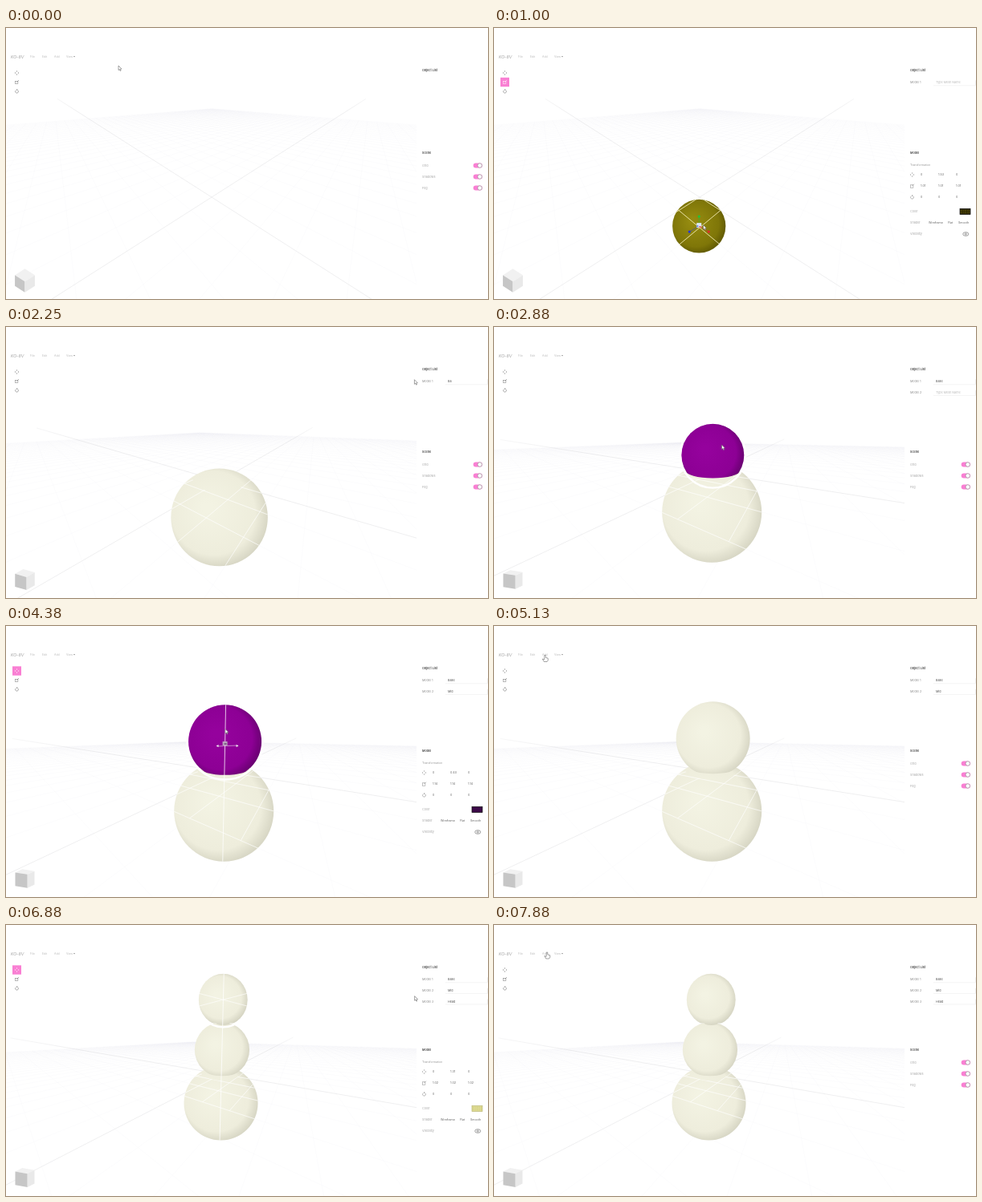
Recreate the animation shown at these times as an HTML page with a canvas. Size 600 by 338 pixels, loop 8 s.

```html
<!DOCTYPE html>
<html lang="en">
<head>
<meta charset="utf-8">
<style>
html, body { margin: 0; width: 100%; height: 100%; overflow: hidden; background: #fff; }
canvas { display: block; }
</style>
</head>
<body>
<canvas id="stage" width="600" height="338"></canvas>
<script>
const c = document.getElementById('stage').getContext('2d');
const LOOP = 8000, STEP = 125, FOCAL = 152, VIEW = 511;
const PINK = '#f97fd3', GRAY = '#a9a9a9', DARK = '#444', CREAM = ['#f3f3e3', '#eeeddc', '#d5d4c2'];
const PURPLE = ['#95029d', '#8d0095', '#66006e'];

// Key points: [time, ...values], eased in between.
// Camera: floor origin x and y, yaw and elevation in degrees, distance, zoom of the balls.
const CAMERA = [
  [1875, 256, 211, 45, 39.7, 4.7, .92],
  [2500, 272, 182, 60, 15.8, 5.2, 1],
  [5375, 272, 182, 60, 15.8, 5.2, 1],
  [5750, 268.3, 186, 60, 17.3, 7, .742]];
// Balls: keys hold height and radius, unit turns both into panel values.
const BALLS = [
  { from: 500, cream: 2000, named: 2125, name: 'Base', unit: [33.4, 35.6],
    tone: ['#958b10', '#7f7608', '#5f5802'], keys: [[500, 0, 36], [875, -51, 36], [1000, -51, 36], [1375, -51, 62]] },
  { from: 2750, cream: 4625, named: 3875, name: 'Mid', unit: [100, 40],
    tone: PURPLE, keys: [[3500, 23, 39], [4375, 39.5, 45.5], [4750, 43, 46]] },
  { from: 5375, cream: 6500, named: 6500, name: 'Head', unit: [100, 40],
    tone: PURPLE, keys: [[6000, 121, 43], [6500, 131, 41]] }];
const PICKS = [
  { from: 500, to: 2125, ball: 0, scaling: [1000, 1500] },
  { from: 3125, to: 4750, ball: 1, scaling: [0, 0] },
  { from: 5625, to: 6500, ball: 1, scaling: [5625, 6250] },
  { from: 6500, to: 7500, ball: 2, scaling: [0, 0] }];
const CURSOR = [[0, 140, 47], [500, 63, 36], [875, 256, 245], [1375, 285, 249], [1750, 546, 245],
  [2125, 560, 69], [2750, 64, 37], [2875, 283.5, 147], [3875, 560, 82], [4375, 273, 128.5],
  [4625, 586, 229], [5125, 63.5, 36.5], [6000, 270.5, 138.5], [6625, 560, 95], [7875, 66, 34]];

let t, cam;

function at(keys) {
  let i = keys.findIndex(k => k[0] > t);
  if (i < 0) i = keys.length;
  const a = keys[Math.max(0, i - 1)], b = keys[Math.min(i, keys.length - 1)];
  const p = b === a ? 0 : (t - a[0]) / (b[0] - a[0]), e = p * p * (3 - 2 * p);
  return a.slice(1).map((v, n) => v + (b[n + 1] - v) * e);
}
function setCamera() {
  const [x, y, yaw, tilt, dist, zoom] = at(CAMERA), rad = Math.PI / 180;
  cam = { x, y, dist, zoom, cy: Math.cos(yaw * rad), sy: Math.sin(yaw * rad),
    ce: Math.cos(tilt * rad), se: Math.sin(tilt * rad) };
}
const turn = (x, z) => [x * cam.cy - z * cam.sy, x * cam.sy + z * cam.cy];

function ballAt(ball) {
  const [h, size] = at(ball.keys), r = size * cam.zoom;
  return { h, size, r, x: cam.x + h * .015, y: cam.y - h * cam.ce * cam.zoom, ry: r * (1 + (h / 500) ** 2) };
}

function line(x1, y1, x2, y2, color, width = 1) {
  c.strokeStyle = color; c.lineWidth = width;
  c.beginPath(); c.moveTo(x1, y1); c.lineTo(x2, y2); c.stroke();
}
function poly(points, fill, stroke) {
  c.beginPath();
  points.forEach(p => c.lineTo(...p));
  c.closePath();
  c.fillStyle = fill; c.fill();
  if (stroke) { c.strokeStyle = stroke; c.lineWidth = .6; c.stroke(); }
}
function oval(x, y, rx, ry = rx) { c.beginPath(); c.ellipse(x, y, rx, ry, 0, 0, 7); }
function box(x, y, w, h, color) { c.fillStyle = color; c.fillRect(x, y, w, h); }
function text(s, x, y, color = GRAY, size = 3.8, style = '') {
  c.font = `${style} ${size}px Inter, sans-serif`;
  c.fillStyle = color; c.fillText(s, x, y);
}

// One straight floor line, cut where it would pass behind the camera.
function floorLine(x1, z1, x2, z2, color, width) {
  let [a, b] = [turn(x1, z1), turn(x2, z2)];
  const depth = p => cam.dist + p[1] * cam.ce, near = .3;
  if (depth(a) > depth(b)) [a, b] = [b, a];
  if (depth(b) < near) return;
  if (depth(a) < near) {
    const k = (near - depth(a)) / (depth(b) - depth(a));
    a = a.map((v, i) => v + (b[i] - v) * k);
  }
  const spot = p => [cam.x + FOCAL * p[0] / depth(p), cam.y - FOCAL * p[1] * cam.se / depth(p)];
  line(...spot(a), ...spot(b), color, width);
}
function floorGrid(reach, color, axisColor, width) {
  for (let k = -reach; k <= reach; k++) {
    const far = k ? reach : 300, shade = k ? color : axisColor;
    floorLine(k, -far, k, far, shade, width);
    floorLine(-far, k, far, k, shade, width);
  }
}
function drawFloor() {
  floorGrid(30, 'rgba(130,135,190,.035)', '#ebebed', .8);
  const top = cam.y - FOCAL * cam.se / cam.ce, fog = c.createLinearGradient(0, top - 2, 0, top + 18);
  fog.addColorStop(0, 'rgba(255,255,255,.6)'); fog.addColorStop(1, 'rgba(255,255,255,0)');
  box(0, top - 2, VIEW, 20, fog);
}

function drawCube() {
  const spot = (x, y, z) => {
    const [right, away] = turn(x, z);
    return [23.5 + 8.8 * right, 315 - 8.8 * (y * cam.ce + away * cam.se)];
  };
  const face = (put, color) =>
    poly([[-1, -1], [1, -1], [1, 1], [-1, 1]].map(([a, b]) => spot(...put(a, b))), color);
  face((a, b) => [a, 1, b], '#f1f1f1');
  face((a, b) => [-1, a, b], '#c6c6c6');
  face((a, b) => [a, b, -1], '#e9e9e9');
}

function drawBall(ball, lower) {
  const { x, y, r, ry, h, size } = ballAt(ball), pale = t >= ball.cream;
  c.save();
  if (lower) {
    // The cut follows the circle where the two spheres meet.
    const low = ballAt(lower), d = low.y - y;
    const cut = (d * d + r * r - low.r * low.r) / (2 * d);
    const half = Math.sqrt(Math.max(0, r * r - cut * cut));
    c.beginPath(); c.rect(0, 0, VIEW, y + cut);
    c.ellipse(x, y + cut, half, half * cam.se, 0, 0, 7); c.clip();
  }
  const g = c.createRadialGradient(x - r * .25, y - ry * .2, r * .1, x - r * .08, y - ry * .05, r * 1.12);
  (pale ? CREAM : ball.tone).forEach((color, n) => g.addColorStop([0, .75, 1][n], color));
  oval(x, y, r, ry); c.fillStyle = g; c.fill(); c.clip();
  if (h <= 0) {
    // The sunken part lies under the floor grid; the dome above hides it.
    const rim = Math.sqrt(size * size - h * h) * cam.zoom, dome = (size + h) * cam.ce * cam.zoom / 2;
    c.beginPath(); c.rect(0, 0, VIEW, 338);
    c.ellipse(cam.x, cam.y - dome, rim, rim * cam.se + dome, 0, 0, 7); c.clip('evenodd');
    const shine = pale ? 'rgba(255,255,255,.75)' : '#f3edb5';
    floorGrid(3, shine, shine, .9);
  }
  c.restore();
}

function drawGizmo(ball) {
  const { x, y, r } = ballAt(ball);
  if (ball === BALLS[0]) {
    [[0, -12, '#1fc43a'], [-12, 7, '#2536d8'], [12, 7, '#e22b2b']].forEach(([dx, dy, color]) => {
      line(x, y, x + dx, y + dy, color, .5);
      oval(x + dx, y + dy, 1.6); c.fillStyle = color; c.fill();
    });
    box(x - 3, y - 4, 6, 6, '#dbe8f4');
    box(x - 3, y - 1, 2, 2, '#6688e0'); box(x, y, 3, 2, '#e06a70');
    return;
  }
  const low = ballAt(BALLS[0]), top = ballAt(BALLS.filter(b => t >= b.from).pop());
  line(top.x + 1, top.y - top.ry, low.x - 1.5, low.y + low.ry, 'rgba(255,255,255,.85)', .9);
  if (t < 5375) {
    line(x - 10, y + 6, x + 16, y + 5, '#e8d8ea', .6);
    for (const [end, dir] of [[-11, 1], [17, -1]])
      poly([[x + end, y + 5.5], [x + end + 3 * dir, y + 4], [x + end + 3 * dir, y + 7]], '#eee');
    box(x - 3, y, 6, 5, '#b9a3bd'); box(x - 1, y + 2, 3, 2, '#83608a');
  } else {
    for (const s of [-1, 1]) line(x - r, y - 8 * s, x + r, y + 8 * s, 'rgba(255,255,255,.8)', .8);
  }
}

function drawScene(pick) {
  c.save(); c.beginPath(); c.rect(0, 0, VIEW, 338); c.clip();
  drawFloor();
  BALLS.forEach((b, i) => t >= b.from && drawBall(b, BALLS[i - 1]));
  const ringed = pick ? pick.ball : t >= 2750 && t < 3125 ? 1 : 0;
  if (ringed) {
    const { x, y, r, ry } = ballAt(BALLS[ringed]);
    oval(x, y, r + 1.7, ry + 1.7); c.strokeStyle = '#fff'; c.lineWidth = 2.4; c.stroke();
  }
  if (pick) drawGizmo(BALLS[pick.ball]);
  drawCube();
  c.restore();
}

function icon(kind, x, y, color) {
  if (kind === 0) {
    for (const [dx, dy] of [[1, 0], [-1, 0], [0, 1], [0, -1]])
      box(x + dx * 2 - .5, y + dy * 2 - .5, 1, 1, color);
  } else if (kind === 1) {
    c.strokeStyle = color; c.lineWidth = .5; c.strokeRect(x - 2, y - 1.2, 3.4, 3.4);
    line(x, y, x + 2.4, y - 2.4, color, .6);
  } else {
    c.strokeStyle = color; c.lineWidth = .6;
    c.beginPath(); c.arc(x, y + .2, 1.9, -.9, 4); c.stroke();
    box(x - .4, y - 2.6, 1.2, 1.2, color);
  }
}

function drawTools(pick) {
  text('KO-8V', 6, 38, '#888', 5.2, 'italic 300');
  ['File', 'Edit', 'Add', 'View'].forEach((s, i) => text(s, 30 + i * 15, 37.2, '#bbb', 3.5));
  poly([[84, 35], [86, 35], [85, 36.6]], '#888');
  const tool = pick ? +(t >= pick.scaling[0] && t < pick.scaling[1]) : -1;
  for (let i = 0; i < 3; i++) {
    const y = 56 + i * 11.5;
    if (i === tool) box(8, y - 5.7, 11, 11.4, PINK);
    icon(i, 13.5, y, i === tool ? '#fff' : '#777');
  }
}

function drawList() {
  text('Object List', 518, 54.3, DARK, 3.7, '600');
  BALLS.forEach((b, i) => {
    if (t < b.from) return;
    const y = 69.3 + i * 13.6, typed = b.name.slice(0, Math.max(0, (t - b.named) / STEP + 1));
    text('Model ' + (i + 1), 518, y, '#909090', 3.7);
    text(typed || 'Type Mesh Name', 550, y, typed ? '#555' : '#bbb', 3.7);
    line(547, y + 2.5, 600, y + 2.5, '#f0f0f0', .7);
    line(599.5, y - 4, 599.5, y + 2, '#ddd', .5);
  });
}

function drawSettings() {
  text('Scene', 518, 157.3, DARK, 3.7, '600');
  ['Grid', 'Shadows', 'Fog'].forEach((s, i) => {
    const y = 171.5 + i * 14;
    text(s, 518, y + 1.2);
    c.fillStyle = PINK; c.beginPath(); c.roundRect(581.7, y - 3, 11.3, 6, 3); c.fill();
    oval(589.8, y, 2.7); c.fillStyle = '#fff'; c.fill();
    c.strokeStyle = '#888'; c.lineWidth = .6; c.stroke();
  });
}

function drawModel(ball) {
  const { h, size } = ballAt(ball), pale = t >= ball.cream, first = ball === BALLS[0];
  const place = (Math.abs(h) / ball.unit[0]).toFixed(2), scale = (size / ball.unit[1]).toFixed(2);
  text('Model', 518, 157.3, DARK, 3.7, '600');
  text('Transformation', 518, 172.3, '#999', 3.5);
  [['0', place, '0'], [scale, scale, scale], ['0', '0', '0']].forEach((row, n) => {
    const y = 183 + n * 14;
    icon(n, 520.5, y, '#888');
    row.forEach((s, k) => text(s, 531 + k * 22, y + 1.3, '#666', 3.7));
  });
  ['Color', 'Shader', 'Visibility'].forEach((s, i) => text(s, 518, 230.3 + i * 14));
  box(580, 225.3, 13, 7.2, pale ? '#dedb94' : first ? '#2b2600' : '#3c0a48');
  c.strokeStyle = pale ? '#bbb878' : '#111'; c.lineWidth = .7; c.strokeRect(580, 225.3, 13, 7.2);
  if (first || pale) {
    c.setLineDash([1, 1.5]);
    for (let y = 227.3; y < 232; y += 1.7) line(581, y, 592.5, y, pale ? '#c9c56f' : '#8d801a', .7);
    c.setLineDash([]);
  }
  ['Wireframe', 'Flat', 'Smooth'].forEach((s, k) => text(s, [541, 565, 578][k], 244.3, '#666', 3.6));
  c.strokeStyle = '#777'; c.lineWidth = .7;
  oval(587.3, 257, 3.6, 2.3); c.stroke();
  oval(587.3, 257, 1.1); c.stroke();
}

function drawCursor() {
  const [x, y] = at(CURSOR);
  c.save(); c.translate(x, y);
  if (x < 95 && y < 42)
    poly([[-.7, 0], [.7, 0], [.9, 3], [3.6, 3.6], [3.8, 6.2], [2.6, 8], [-1.2, 8], [-3.2, 4.6], [-.8, 5.3]], '#fff', '#666');
  else
    poly([[0, 0], [0, 5.6], [1.3, 4.5], [2.2, 6.5], [3.1, 6.1], [2.2, 4.2], [3.9, 4]], '#fff', '#666');
  c.restore();
}

function frame() {
  t = Math.floor((performance.now() % LOOP + .1) / STEP) * STEP;
  setCamera();
  const pick = PICKS.find(p => t >= p.from && t < p.to);
  box(0, 0, 600, 338, '#fff');
  drawScene(pick);
  drawTools(pick);
  drawList();
  if (pick) drawModel(BALLS[pick.ball]); else drawSettings();
  drawCursor();
  requestAnimationFrame(frame);
}
frame();
</script>
</body>
</html>
```
